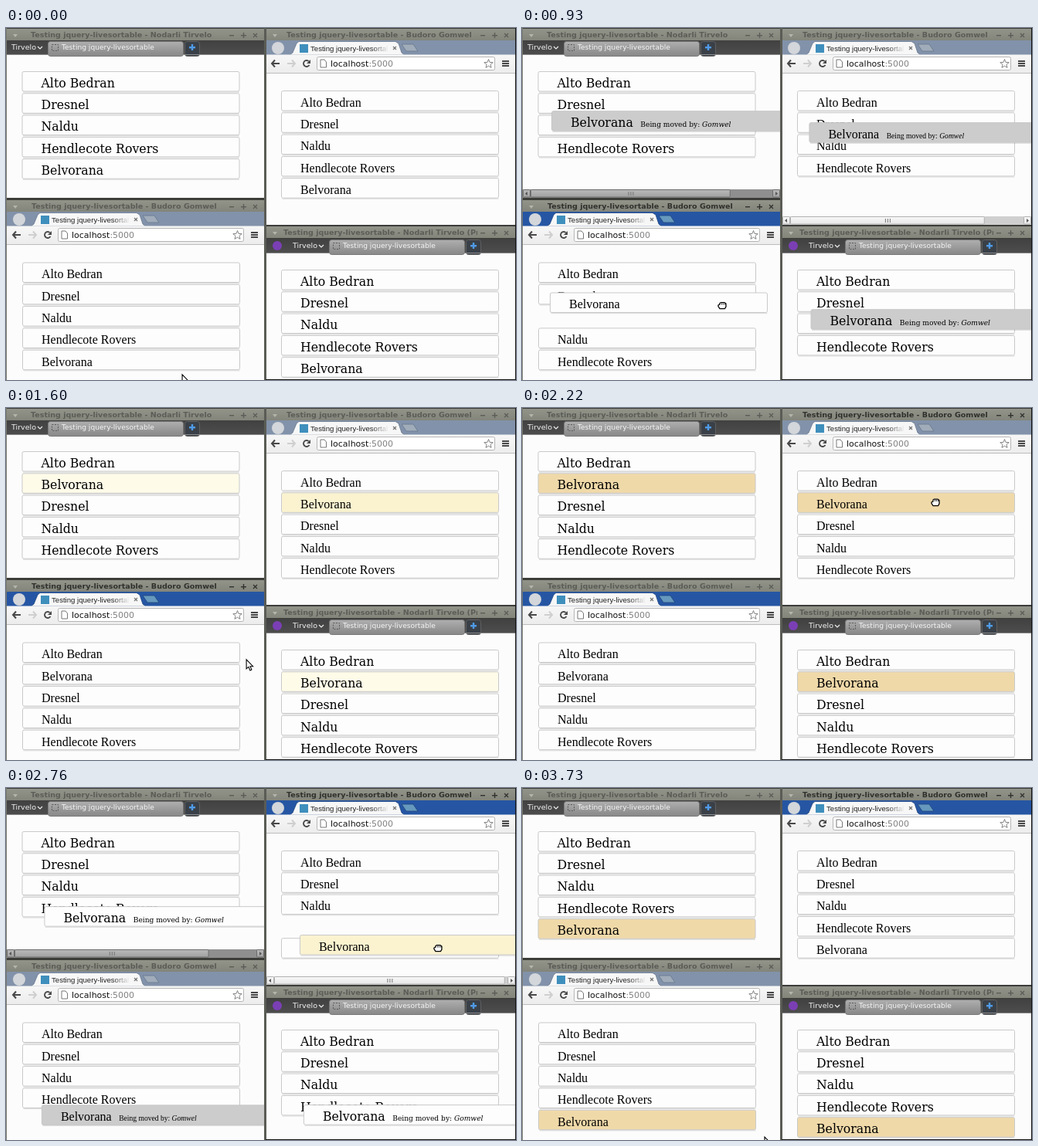
Animation, 660 px wide and 456 px high, one loop 3830 ms. Source, as an HTML page with a canvas:

```html
<!DOCTYPE html>
<html lang="en">
<head>
<meta charset="utf-8">
<title>Testing jquery-livesortable</title>
<style>
html, body { margin: 0; width: 660px; height: 456px; overflow: hidden; background: #3c3d39; }
canvas { display: block; }
</style>
</head>
<body>
<canvas id="stage" width="660" height="456"></canvas>
<script>
const ctx = document.getElementById('stage').getContext('2d');
const LOOP = 3830, ROW = 28.3, ROW_W = 281, ROW_H = 26;
const SANS = '"DejaVu Sans", sans-serif';
const DEJA_SERIF = '"DejaVu Serif", serif';
const TIMES = '"Liberation Serif", serif';
const MOVED = 'Belvorana';
const OTHERS = ['Alto Bedran', 'Dresnel', 'Naldu', 'Hendlecote Rovers'];
const TITLE = 'Testing jquery-livesortable';
const FLASH = ['#fdfdfd', '#fefbe8', '#fbf3d0', '#f5e5bc', '#f0d9a9'];

// time, x, y of the mouse
const PATH = [
  [0, 228, 449], [340, 244, 433], [420, 244, 433], [510, 257, 426], [620, 269, 407],
  [930, 259, 359], [1010, 256, 361], [1090, 259, 356], [1200, 276, 338], [1280, 285, 338],
  [1600, 311, 326], [1720, 322, 312], [2080, 535, 120], [2220, 535, 122], [2340, 535, 126],
  [2420, 535, 126], [2680, 564, 195], [2760, 559, 207], [2950, 548, 214], [3150, 541, 214],
  [3300, 500, 262], [3730, 314, 452]
];
const DRAGS = [
  { from: 400, to: 1280, source: 'C', grab: [244, 320], slot: y => Math.ceil(y / ROW) },
  { from: 2400, to: 3150, source: 'B', grab: [535, 98], slot: y => Math.floor(y / ROW) }
];

// x, w: frame; top: title bar; tabs: tab strip; view: page top and bottom
const WINDOWS = [
  { id: 'A', x: 1, w: 333, top: 1, tabs: 16, view: [34, 220], list: [21, 56.5], titleX: 32,
    lag: 80, cloneW: 364, flash: [[1540, 2300], [3420, 9999]] },
  { id: 'B', light: true, x: 337, w: 322, top: 1, tabs: 16, view: [59, 255], list: [356.5, 81.5],
    titleX: 363, lag: 15, cloneW: 350, flash: [[1500, 2520]] },
  { id: 'C', light: true, x: 1, w: 333, top: 223, tabs: 238, view: [281, 456], list: [21.5, 304],
    titleX: 33, lag: 15, cloneW: 350, flash: [[3380, 9999]] },
  { id: 'D', secret: true, x: 337, w: 322, top: 257, tabs: 273, view: [291, 455], list: [356.5, 313.5],
    titleX: 359, lag: 80, cloneW: 364, flash: [[1540, 2300], [3420, 9999]] }
];

function rect(x, y, w, h, fill) {
  ctx.fillStyle = fill;
  ctx.fillRect(x, y, w, h);
}

function shape(points, fill, stroke, width = 1) {
  ctx.beginPath();
  points.forEach(p => ctx.lineTo(p[0], p[1]));
  if (fill) { ctx.closePath(); ctx.fillStyle = fill; ctx.fill(); }
  if (stroke) { ctx.strokeStyle = stroke; ctx.lineWidth = width; ctx.stroke(); }
}

function disc(x, y, r, fill) {
  ctx.beginPath();
  ctx.arc(x, y, r, 0, 7);
  ctx.fillStyle = fill;
  ctx.fill();
}

function box(x, y, w, h, r, fill, stroke) {
  ctx.beginPath();
  ctx.roundRect(x, y, w, h, r);
  ctx.fillStyle = fill;
  ctx.fill();
  if (stroke) { ctx.strokeStyle = stroke; ctx.lineWidth = 1; ctx.stroke(); }
}

function text(str, x, y, font, fill) {
  ctx.font = font;
  ctx.fillStyle = fill;
  ctx.fillText(str, x, y);
  return x + ctx.measureText(str).width;
}

function shade(y0, y1, from, to) {
  const g = ctx.createLinearGradient(0, y0, 0, y1);
  g.addColorStop(0, from);
  g.addColorStop(1, to);
  return g;
}

function clipped(x, y, w, h, draw) {
  ctx.save();
  ctx.beginPath();
  ctx.rect(x, y, w, h);
  ctx.clip();
  draw();
  ctx.restore();
}

function pointer(t) {
  const i = PATH.findIndex(p => p[0] > t);
  if (i < 0) return PATH[PATH.length - 1].slice(1);
  const a = PATH[Math.max(0, i - 1)], b = PATH[i];
  const k = (t - a[0]) / (b[0] - a[0] || 1);
  return [a[1] + (b[1] - a[1]) * k, a[2] + (b[2] - a[2]) * k];
}

function flashLevel(win, t) {
  for (const [start, fade] of win.flash) {
    if (t < start) continue;
    const up = Math.min(4, Math.floor((t - start) / 45));
    const down = t > fade ? Math.floor((t - fade) / 90) : 0;
    if (down < 4) return up - down;
  }
  return 0;
}

function titleBar(win, active) {
  const { x, w, top } = win, y = top + 8, ink = active ? '#30312c' : '#5b5d56';
  rect(x, top, w, 15, shade(top, top + 15, '#92948a', '#83857b'));
  shape([[x + 8, y - 1], [x + 14, y - 1], [x + 11, y + 3]], '#b4b6ac');
  const name = win.light ? 'Budoro Gomwel' : 'Nodarli Tirvelo';
  const tail = win.secret ? ' (Private Browsing)' : '';
  clipped(x, top, win.secret ? 273 : w, 15, () =>
    text(TITLE + ' - ' + name + tail, win.titleX, top + 11, 'bold 9.55px ' + SANS, ink));
  const r = x + w;
  rect(r - 45, y, 6, 1.4, ink);
  rect(r - 30, y, 7, 1.4, ink);
  rect(r - 27.2, y - 3, 1.4, 7, ink);
  shape([[r - 14, y - 2], [r - 9, y + 3]], null, ink, 1.3);
  shape([[r - 9, y - 2], [r - 14, y + 3]], null, ink, 1.3);
}

function darkTabs(win) {
  const y = win.tabs, x = win.secret ? 364 : 0;
  rect(win.x, y, win.w, 18, shade(y, y + 18, '#414141', '#4d4d4d'));
  if (win.secret) disc(351, y + 9, 6, '#7b3fb5');
  text('Tirvelo', x + 7, y + 12, '9.5px ' + SANS, '#f2f2f2');
  shape([[x + 41, y + 8], [x + 44, y + 11], [x + 47, y + 8]], null, '#eee', 1.2);
  box(x + 54.5, y + 1.5, 175, 19, 3, shade(y, y + 18, '#b2b2b2', '#8c8c8c'), '#777');
  ctx.setLineDash([2, 1.5]);
  ctx.strokeStyle = '#5a5a5a';
  ctx.strokeRect(x + 59.5, y + 5.5, 8, 8);
  ctx.setLineDash([]);
  text(TITLE, x + 72, y + 12, '9.1px ' + SANS, '#f6f6f6');
  box(x + 231.5, y + 1.5, 19, 19, 3, '#3a4048', '#606060');
  rect(x + 237, y + 8, 8, 2.4, '#4f9be8');
  rect(x + 239.8, y + 5, 2.4, 8, '#4f9be8');
  rect(win.x, y + 18, win.w, 1, '#8c8c8c');
}

function lightTabs(win, active) {
  const x = win.id === 'B' ? 335 : 0, y = win.tabs, bottom = win.view[0], right = win.x + win.w;
  rect(win.x, y, win.w, 20, active ? '#2656a3' : '#8292aa');
  disc(x + 17, y + 10, 8, '#d3d6da');
  shape([[x + 177, y + 5], [x + 192, y + 5], [x + 198, y + 14], [x + 183, y + 14]],
    active ? '#6699bd' : '#a0acb9', active ? '#1f447f' : '#68788e', 0.8);
  shape([[x + 32, y + 19], [x + 36, y + 16], [x + 41, y + 4], [x + 44, y + 1.5], [x + 169, y + 1.5],
    [x + 173, y + 4], [x + 177, y + 16], [x + 181, y + 19]], '#f7f7f7', active ? '#1f447f' : '#68788e', 0.8);
  rect(x + 45, y + 5, 11, 11, '#3f8fbd');
  const fade = ctx.createLinearGradient(x + 138, 0, x + 160, 0);
  fade.addColorStop(0, '#222');
  fade.addColorStop(1, 'rgba(34,34,34,0)');
  clipped(x + 58, y, 101, 18, () => text(TITLE, x + 59, y + 14, '9.6px "Liberation Sans", sans-serif', fade));
  shape([[x + 166, y + 8], [x + 170, y + 12]], null, '#777', 1.2);
  shape([[x + 170, y + 8], [x + 166, y + 12]], null, '#777', 1.2);

  rect(win.x, y + 18.5, win.w, bottom - y - 18.5, shade(y + 18, bottom, '#f7f7f7', '#ececec'));
  rect(win.x, bottom - 1, win.w, 1, '#bdbdbd');
  const cy = y + 30;
  for (const [ax, dir, ink] of [[x + 14, -1, '#484848'], [x + 34, 1, '#cfcfcf']]) {
    shape([[ax - 5, cy], [ax + 5, cy]], null, ink, 2);
    shape([[ax + dir, cy - 4.5], [ax + 5 * dir, cy], [ax + dir, cy + 4.5]], null, ink, 2);
  }
  ctx.beginPath();
  ctx.arc(x + 54, cy, 4, 0.5, 5.5);
  ctx.strokeStyle = '#484848';
  ctx.lineWidth = 1.8;
  ctx.stroke();
  shape([[x + 59, cy - 5], [x + 59, cy], [x + 54, cy]], '#484848');

  box(x + 67.5, cy - 8.5, right - 26 - x - 68, 17, 2, '#fff', '#b4b4b4');
  shape([[x + 72, cy - 5], [x + 77, cy - 5], [x + 79.5, cy - 2], [x + 79.5, cy + 5], [x + 72, cy + 5]],
    '#fff', '#777');
  const end = text('localhost', x + 85, cy + 4, '11px ' + SANS, '#111');
  text(':5000', end, cy + 4, '11px ' + SANS, '#808080');
  const star = [];
  for (let i = 0; i <= 10; i++) {
    const r = i % 2 ? 2.6 : 6, a = i * Math.PI / 5;
    star.push([right - 34.5 + r * Math.sin(a), cy + 0.5 - r * Math.cos(a)]);
  }
  shape(star, '#fff', '#777', 0.9);
  for (const dy of [-4, -1, 2]) rect(right - 17, cy + dy, 9, 2, '#484848');
}

function item(win, name, x, y, fill, width, tag) {
  const grey = fill === '#cccccc', serif = win.light ? TIMES : DEJA_SERIF;
  rect(x + 1, y + ROW_H, width - 1, 1.2, 'rgba(0,0,0,.12)');
  box(x, y, width, ROW_H - 0.5, 2, fill, grey ? '#c6c6c6' : '#c9c9c9');
  const end = text(name, x + 24.5, y + 20.3, (win.light ? 16 : 15.75) + 'px ' + serif, '#000');
  if (!tag) return;
  const size = (win.light ? 9.6 : 9.1) + 'px ' + serif;
  const next = text('Being moved by: ', end + 9.5, y + 20.3, size, '#000');
  text('Gomwel', next, y + 20.3, 'italic ' + size, '#000');
}

function scrollBar(win, contentRight) {
  const { x, w, view, light } = win, y = view[1] - 11, track = w - 21;
  if (contentRight <= x + w) return;
  const thumb = track * w / (contentRight - x);
  rect(x, y, w, 11, light ? '#cfcfcf' : '#8f8f8f');
  const fill = shade(y, y + 11, light ? '#fafafa' : '#b9b9b9', light ? '#e4e4e4' : '#a0a0a0');
  const edge = light ? '#b0b0b0' : '#6c6c6c';
  for (const [bx, bw] of [[x, 10], [x + 10, thumb], [x + w - 10, 10]]) {
    box(bx + 0.5, y + 0.5, bw - 1, 9.5, 1, fill, edge);
  }
  const c = y + 5.5, mid = x + 10 + thumb / 2;
  shape([[x + 6, c - 2.5], [x + 3, c], [x + 6, c + 2.5]], '#555');
  shape([[x + w - 6, c - 2.5], [x + w - 3, c], [x + w - 6, c + 2.5]], '#555');
  for (const d of [-3, 0, 3]) rect(mid + d, c - 2.5, 1, 5, '#777');
}

function page(win, t) {
  const { x, w, view, list } = win;
  const shift = d => win.id === d.source ? 0 : win.lag;
  const drag = DRAGS.find(d => t - shift(d) >= d.from && t - shift(d) < d.to);
  const moved = t >= DRAGS[0].to + shift(DRAGS[0]) && t < DRAGS[1].to + shift(DRAGS[1]);
  const flash = FLASH[flashLevel(win, t)];
  rect(x, view[0], w, view[1] - view[0], '#fcfcfc');
  clipped(x, view[0], w, view[1] - view[0], () => {
    const local = drag && drag.source === win.id;
    let dx, dy, slot = moved ? 1 : 4;
    if (drag) {
      const p = pointer(t - shift(drag));
      dx = p[0] - drag.grab[0];
      dy = p[1] - drag.grab[1];
      slot = local ? Math.max(0, Math.min(4, drag.slot(dy))) : 4;
    }
    const names = OTHERS.slice();
    names.splice(slot, 0, MOVED);
    names.forEach((name, i) => {
      const held = name === MOVED;
      if (held && drag) return;
      item(win, name, list[0], list[1] + i * ROW, held ? flash : FLASH[0], ROW_W);
    });
    if (!drag) return;
    const flashed = drag === DRAGS[1] && win.id !== 'C';
    const fill = local || flashed ? flash : '#cccccc';
    const width = local ? ROW_W : win.cloneW;
    item(win, MOVED, list[0] + dx, list[1] + dy, fill, width, !local);
    if (view[1] < 300) scrollBar(win, list[0] + dx + width);
  });
}

function cursor(t) {
  const [x, y] = pointer(t);
  const grabbing = DRAGS.some(d => t >= d.from && t < d.to);
  const hovering = (t > 240 && t < 400) || (t > 2060 && t < 2400);
  if (!grabbing && !hovering) {
    shape([[x, y], [x, y + 12], [x + 2.8, y + 9.5], [x + 4.8, y + 14], [x + 6.8, y + 13],
      [x + 4.9, y + 8.8], [x + 8.5, y + 8.8], [x, y]], '#fff', '#000', 1.1);
    return;
  }
  const top = y - (grabbing ? 3.5 : 4);
  shape([[x - 5, y], [x - 3, y - 1], [x - 3, top + 1], [x - 1.5, top], [x + 3, top], [x + 5, top + 1.5],
    [x + 5, y + 2], [x + 3.5, y + 4.5], [x - 3, y + 4.5], [x - 5, y + 1.5], [x - 5, y]], '#fff', '#000', 1.3);
  for (const d of [-1, 1, 3]) rect(x + d, top + 1, 0.8, 2, '#000');
}

function draw(t) {
  rect(0, 0, 660, 456, '#3c3d39');
  rect(0, 0, 1, 456, '#77796f');
  rect(334, 0, 3, 456, '#5a5c55');
  const titled = t >= 1820 ? 'B' : t >= 240 ? 'C' : '';
  const focused = t >= 2400 ? 'B' : t >= 380 ? 'C' : '';
  for (const win of WINDOWS) {
    page(win, t);
    titleBar(win, win.id === titled);
    if (win.light) lightTabs(win, win.id === focused);
    else darkTabs(win);
  }
  rect(659, 0, 1, 456, '#111');
  rect(336, 455, 324, 1, '#111');
  cursor(t);
}

function tick() {
  draw(performance.now() % LOOP);
  requestAnimationFrame(tick);
}
tick();
</script>
</body>
</html>
```
